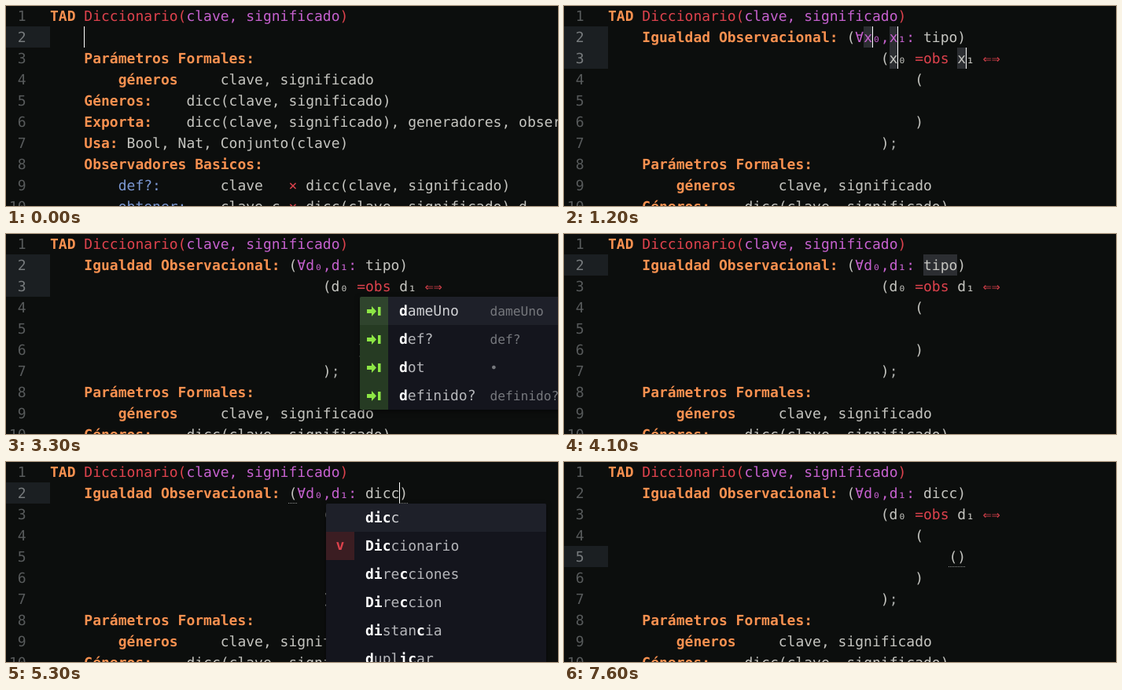
Recreate the animation shown at these times as an HTML page. Size 702 by 255 pixels, loop 8000 ms.

```html
<!DOCTYPE html>
<html lang="es">
<head>
<meta charset="utf-8">
<title>Editor</title>
<style>
  html, body { margin: 0; width: 100%; height: 100%; overflow: hidden; background: #0c0e0d; }
  #stage {
    position: relative; width: 702px; height: 255px; overflow: hidden;
    font: 18px/29px "DejaVu Sans Mono", monospace; white-space: pre;
    text-rendering: geometricPrecision; color: #c5c5c0; background: #0c0e0d;
  }
  #stage div { position: absolute; }
  .gutter { left: 0; width: 56px; height: 27px; color: #575a5b; }
  .gutter span { display: block; width: 25.7px; text-align: right; direction: rtl; }
  .active { background: #1b1f22; color: #777b7d; }
  .line { left: 56px; }
  .key { color: #f99150; font-weight: bold; }
  .red { color: #de424d; }
  .arg { color: #c661cf; }
  .fn { color: #7c98d3; }
  .dim { color: #a9aaa8; }
  .mark { height: 27px; background: #2c2e32; }
  .caret { width: 1px; height: 27px; background: #fff; }
  .bracket { height: 1px; background: repeating-linear-gradient(90deg, #8d8f8e 0 1px, transparent 1px 2px); }
  .popup { background: #14151d; box-shadow: 0 2px 6px rgba(0, 0, 0, .5); overflow: hidden; border-radius: 2px; }
  #stage .item { position: relative; height: 36px; line-height: 38px; padding: 0 18px 0 50px; color: #b5b6ba; }
  #stage .item:first-child { background: #1e2029; color: #cfd0d3; }
  .item b { color: #fff; }
  .detail { margin-left: 18px; font-size: .9em; color: #76787d; }
  .icon { position: absolute; left: 0; top: 0; width: 36px; height: 36px; line-height: 36px; }
  .snippet { background: rgba(120, 230, 60, .18); fill: #8de645; }
  .variable { background: #3b1d22; color: #dc424c; font-weight: bold; text-align: center; }
</style>
</head>
<body>
<div id="stage"></div>
<script>
const stage = document.getElementById('stage');
const LOOP = 8000, CELL = 10.837, LEFT = 56;
const colX = col => Math.round(LEFT + col * CELL);
const rowY = row => 27 * (row - 1) - 1;

const paint = name => text => `<span class="${name}">${text}</span>`;
const [key, red, arg, fn, dim] = ['key', 'red', 'arg', 'fn', 'dim'].map(paint);
const pad = n => ' '.repeat(n);

// Document text
const title = key('TAD') + ' ' + red('Diccionario(') + arg('clave, significado') + red(')');
const dicc = 'dicc(clave, significado)';
const formals = [
  pad(4) + key('Parámetros Formales:'),
  pad(8) + key('géneros') + pad(5) + 'clave, significado',
  pad(4) + key('Géneros:') + pad(4) + dicc,
  pad(4) + key('Exporta:') + pad(4) + dicc + ', generadores, observadores',
  pad(4) + key('Usa:') + ' Bool, Nat, Conjunto(clave)',
  pad(4) + key('Observadores Basicos:'),
  pad(8) + fn('def?:') + pad(7) + 'clave   ' + red('×') + ' ' + dicc,
  pad(8) + fn('obtener:') + pad(4) + 'clave c ' + red('×') + ' ' + dicc + ' d'
];
const draft = typed => [title, pad(4) + typed, ...formals];
const equality = (v, type, body = '') => [
  title,
  pad(4) + key('Igualdad Observacional:') + ' (' + arg(`∀${v}₀,${v}₁:`) + ` ${type})`,
  pad(32) + `(${v}₀ ${red('=obs')} ${v}₁ ${red('⇐⇒')}`,
  pad(36) + '(',
  pad(40) + body,
  pad(36) + ')',
  pad(32) + ')' + dim(';'),
  ...formals
];

// Completion lists: [label, detail, icon]
const snippet = (label, detail) => [label, detail, 'snippet'];
const observational = snippet('Igualdad observacional', 'Igualdad Observacional');
const conditions = [
  observational,
  snippet('if', 'if Condition'),
  snippet('iff', '↔'),
  snippet('iffalt', '⇐⇒'),
  snippet('ifthen', 'if Condition inline'),
  snippet('implica', '⇒')
];
const defined = snippet('definido?', 'definido?');
const dSnippets = [snippet('dameUno', 'dameUno'), snippet('def?', 'def?'), snippet('dot', '•'), defined];
const variable = ['Diccionario', '', 'variable'];
const words = [['dicc'], variable, ['direcciones'], ['Direccion'], ['distancia'], ['duplicar']];
const popup = (row, col, query, items, width = 0) => ({ row, col, query, items, width });

// Positions are [row, column] or [row, column, length]
const variableEnds = [[2, 31], [2, 34], [3, 34], [3, 42]];
const typeStep = type => ({
  lines: equality('d', type),
  carets: [[2, 37 + type.length]],
  brackets: [[2, 28, 1], [2, 37 + type.length, 1]],
  marks: [], on: true
});

const steps = [
  [0, { lines: draft(''), active: [2], carets: [[2, 4]], on: true, marks: [], brackets: [], popup: null }],
  [100, { on: false }],
  [600, { lines: draft('I'), carets: [[2, 5]], on: true, popup: popup(2, 4, 'i', conditions) }],
  [900, { lines: draft('Ig'), carets: [[2, 6]] }],
  [1000, { popup: popup(2, 4, 'ig', [observational]) }],
  [1200, {
    lines: equality('x', 'tipo'), active: [2, 3], carets: variableEnds, popup: null,
    marks: variableEnds.map(([row, col]) => [row, col - 1, 1])
  }],
  [1500, { on: false }],
  [2000, { on: true }],
  [2300, { on: false }],
  [2700, { on: true }],
  [3300, { lines: equality('d', 'tipo'), marks: [], on: false, popup: popup(3, 41, 'd', dSnippets) }],
  [3400, { on: true, popup: null }],
  [3700, { on: false }],
  [3800, { active: [2], carets: [[2, 41]], marks: [[2, 37, 4]], on: true }],
  [4100, { on: false }],
  [4500, typeStep('d')],
  [4600, { popup: popup(2, 37, 'd', dSnippets) }],
  [4800, { ...typeStep('di'), popup: popup(2, 37, 'di', [defined]) }],
  [5100, { ...typeStep('dic'), popup: popup(2, 37, 'dic', words, 280) }],
  [5300, typeStep('dicc')],
  [5400, { popup: popup(2, 37, 'dicc', [variable, ['direcciones'], ['Direccion']], 243) }],
  [5600, { on: false }],
  [5700, { on: true, popup: null }],
  [6000, { on: false }],
  [6100, { active: [5], carets: [[5, 40]], brackets: [], on: true }],
  [6400, { on: false }],
  [6800, { on: true }],
  [7300, { lines: equality('d', 'dicc', '()'), carets: [[5, 41]], brackets: [[5, 40, 2]] }],
  [7600, { on: false }]
];
let last = {};
const states = steps.map(([, change]) => last = { ...last, ...change });

const box = (name, x, y, style = '', body = '') =>
  `<div class="${name}" style="left:${x}px;top:${y}px;${style}">${body}</div>`;
const span = (col, length) => `width:${colX(col + length) - colX(col)}px`;

const icons = {
  snippet: `<svg class="icon snippet"><path d="M9 16h6v-4l6 6.500-6 6.500v-4H9zM23 13h3.500v11H23z"/></svg>`,
  variable: '<span class="icon variable">v</span>'
};

// Bolds the query letters in order of appearance
function highlight(label, query) {
  let found = 0;
  return [...label].map(ch =>
    ch.toLowerCase() === query[found] ? (found++, `<b>${ch}</b>`) : ch).join('');
}

function popupHtml({ row, col, query, items, width }) {
  const longest = Math.max(...items.map(([label]) => label.length));
  const rows = items.map(([label, detail, icon]) =>
    `<div class="item">${icons[icon] || ''}${highlight(label, query)}` +
    (detail ? pad(longest - label.length) + `<span class="detail">${detail}</span>` : '') + '</div>');
  return box('popup', colX(col) - 50, rowY(row + 1), width ? `width:${width}px` : 'width:max-content', rows.join(''));
}

function render(state) {
  const parts = [];
  for (let row = 1; row <= 10; row++) {
    const name = state.active.includes(row) ? 'gutter active' : 'gutter';
    parts.push(box(name, 0, rowY(row), '', `<span>${row}</span>`));
  }
  for (const [row, col, length] of state.marks) parts.push(box('mark', colX(col), rowY(row), span(col, length)));
  state.lines.slice(0, 10).forEach((line, i) => parts.push(box('line', LEFT, rowY(i + 1), '', line)));
  for (const [row, col, length] of state.brackets) parts.push(box('bracket', colX(col), rowY(row) + 26, span(col, length)));
  if (state.on) for (const [row, col] of state.carets) parts.push(box('caret', colX(col), rowY(row)));
  if (state.popup) parts.push(popupHtml(state.popup));
  stage.innerHTML = parts.join('');
}

let shown = -1;
function tick() {
  const time = performance.now() % LOOP;
  const index = steps.filter(([start]) => start <= time).length - 1;
  if (index !== shown) render(states[shown = index]);
  requestAnimationFrame(tick);
}
tick();
</script>
</body>
</html>
```
